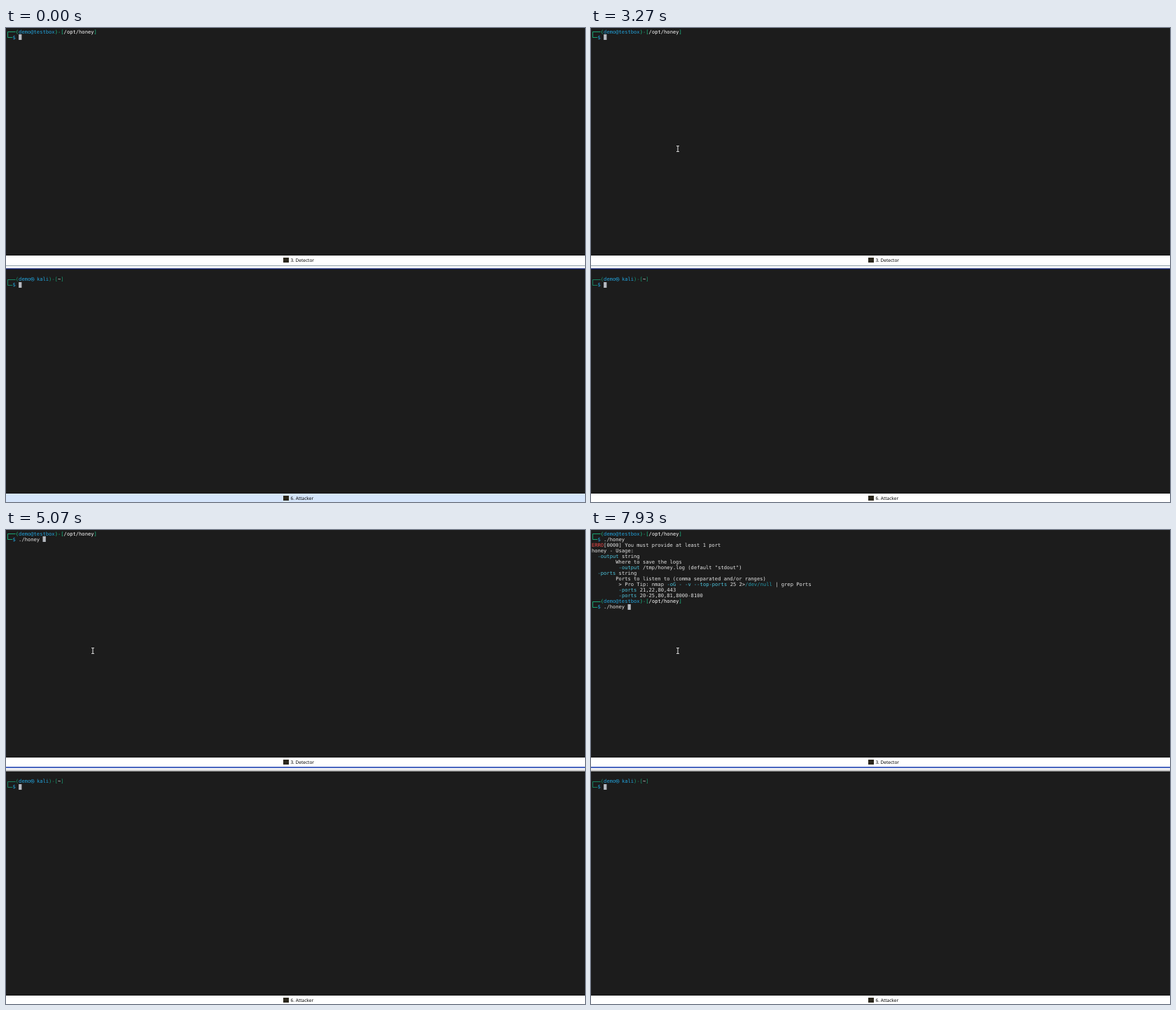
An HTML page with a canvas that plays this animation: 827x677 px, repeating every 8 s.

```html
<!DOCTYPE html>
<html lang="en">
<head>
<meta charset="utf-8">
<title>Two terminals</title>
<style>
  html, body { margin: 0; width: 100%; height: 100%; overflow: hidden; background: #1c1c1c; }
  canvas { display: block; }
</style>
</head>
<body>
<canvas id="stage" width="827" height="677"></canvas>
<script>
const ctx = document.getElementById('stage').getContext('2d');
const LOOP = 8000, W = 827;
const COL = 4.3, ROW = 8.07, LEFT = 0.9;
const MONO = '7.14px "DejaVu Sans Mono", monospace';
const LABEL = '6.5px "Noto Sans", sans-serif';
const C = {
  bg: '#1c1c1c', text: '#e4e4e4', bright: '#ffffff', green: '#1bc58a', dimGreen: '#179a72',
  blue: '#22a3dc', cyan: '#4cc3dc', teal: '#2496a8', red: '#f04a4a', block: '#b5b9c0'
};
const TOP = 1, BOTTOM = 354.7;

// Typed text at each moment, for the two command lines.
const FIRST = [[0, ''], [4400, '.'], [4470, './'], [4800, './h'], [4870, './ho'],
  [4930, './hon'], [5000, './hone'], [5070, './honey '], [5470, './honey']];
const SECOND = [[0, ''], [7070, '.'], [7130, './'], [7470, './h'], [7530, './ho'],
  [7670, './hon'], [7930, './honey ']];
const POINTER = [[130, [236, 520]], [200, [186, 360]], [270, [150, 250]],
  [330, [133, 195]], [400, [126, 174]], [3270, [124, 172]]];
const OUTPUT_AT = 5470, FOCUS_AT = 3600, HOVER_END = 130;

// Each line is a start column followed by [text, colour] runs.
const OUTPUT = [
  [0, ['ERRO', C.red], ['[0000] You must provide at least 1 port']],
  [0, ['honey - Usage:']],
  [2, ['-output', C.cyan], [' string']],
  [8, ['Where to save the logs']],
  [9, ['-output', C.cyan], [' /tmp/honey.log (default "stdout")']],
  [2, ['-ports', C.cyan], [' string']],
  [8, ['Ports to listen to (comma separated and/or ranges)']],
  [9, ['> Pro Tip: nmap '], ['-oG - -v --top-ports', C.cyan], [' 25 2>'],
    ['/dev/null', C.teal], [' | grep Ports']],
  [9, ['-ports', C.cyan], [' 21,22,80,443']],
  [9, ['-ports', C.cyan], [' 20-25,80,81,8000-8100']]
];

function latest(steps, t) {
  let value = null;
  for (const [at, v] of steps) if (t >= at) value = v;
  return value;
}

function box(color, x, y, w, h) {
  ctx.fillStyle = color;
  ctx.fillRect(x, y, w, h);
}

function write(top, row, col, ...runs) {
  ctx.font = MONO;
  for (const [text, color = C.text] of runs) {
    ctx.fillStyle = color;
    ctx.fillText(text, LEFT + col * COL, top + row * ROW + 6.5);
    col += text.length;
  }
}

function promptFrame(top, row, color) {
  const y = Math.round(top + row * ROW + 4);
  ctx.strokeStyle = color;
  ctx.lineWidth = 0.8;
  ctx.beginPath();
  ctx.moveTo(13.8, y + 0.5);
  ctx.lineTo(2.5, y + 0.5);
  ctx.lineTo(2.5, y + 8.5);
  ctx.lineTo(9.3, y + 8.5);
  ctx.stroke();
  write(top, row + 1, 2, ['$', C.blue]);
}

function commandLine(top, row, typed, active) {
  write(top, row, 4, [typed]);
  if (active) box(C.block, LEFT + (4 + typed.length) * COL, Math.round(top + row * ROW), COL, 8);
}

function hostPrompt(row) {
  promptFrame(TOP, row, C.green);
  write(TOP, row, 3, ['(', C.green], ['demo@testbox', C.blue], [')-[', C.green],
    ['/opt/honey', C.bright], [']', C.green]);
}

function attackerPrompt() {
  promptFrame(BOTTOM, 0, C.dimGreen);
  write(BOTTOM, 0, 3, ['(', C.dimGreen], ['demo', C.blue]);
  ctx.font = '5.8px "Noto Sans CJK KR", "Noto Sans CJK JP", sans-serif';
  ctx.fillText('㉿', 35.1, BOTTOM + 6);
  write(BOTTOM, 0, 10, ['kali', C.blue], [')-[', C.dimGreen], ['~', C.bright], [']', C.dimGreen]);
  commandLine(BOTTOM, 1, '', true);
}

function tab(y, h, color, text, x) {
  box(color, 0, y, W, h);
  box('#2b271c', 396, y + 3, 8, 7);
  ctx.font = LABEL;
  ctx.fillStyle = '#000';
  ctx.fillText(text, x, y + 9);
}

function splitter(focused) {
  const rows = focused
    ? ['#5872c6', '#3c5cba', '#f6f7fb', '#f4f4f4', '#e2e2e2', '#c9c9c9', '#8d8d8d']
    : ['#ffffff', '#93a3ac', '#f4f4f4', '#ffffff', '#e6e8f0', '#515f9c', '#131a45'];
  rows.forEach((color, i) => box(color, 0, 338 + i, W, 1));
}

function pointer([x, y]) {
  box('#e8e8e8', x - 0.5, y - 3, 1, 7);
  box('#d0d0d0', x - 2, y - 4, 4, 1);
  box('#d0d0d0', x - 2, y + 4, 4, 1);
}

function draw(t) {
  box(C.bg, 0, 0, W, 677);
  ctx.textBaseline = 'alphabetic';
  ctx.textRendering = 'geometricPrecision';

  const finished = t >= OUTPUT_AT;
  hostPrompt(0);
  commandLine(TOP, 1, latest(FIRST, t), !finished);
  if (finished) {
    OUTPUT.forEach(([col, ...runs], i) => write(TOP, i + 2, col, ...runs));
    hostPrompt(12);
    commandLine(TOP, 13, latest(SECOND, t), true);
  }
  attackerPrompt();

  tab(325, 13, '#ffffff', '3. Detector', 406.4);
  splitter(t >= FOCUS_AT);
  tab(665, 12, t < HOVER_END ? '#d5e5fb' : '#ffffff', '6. Attacker', 406.6);

  const spot = latest(POINTER, t);
  if (spot) pointer(spot);
}

const start = performance.now();
function tick() {
  draw((performance.now() - start) % LOOP);
  requestAnimationFrame(tick);
}
tick();
</script>
</body>
</html>
```
